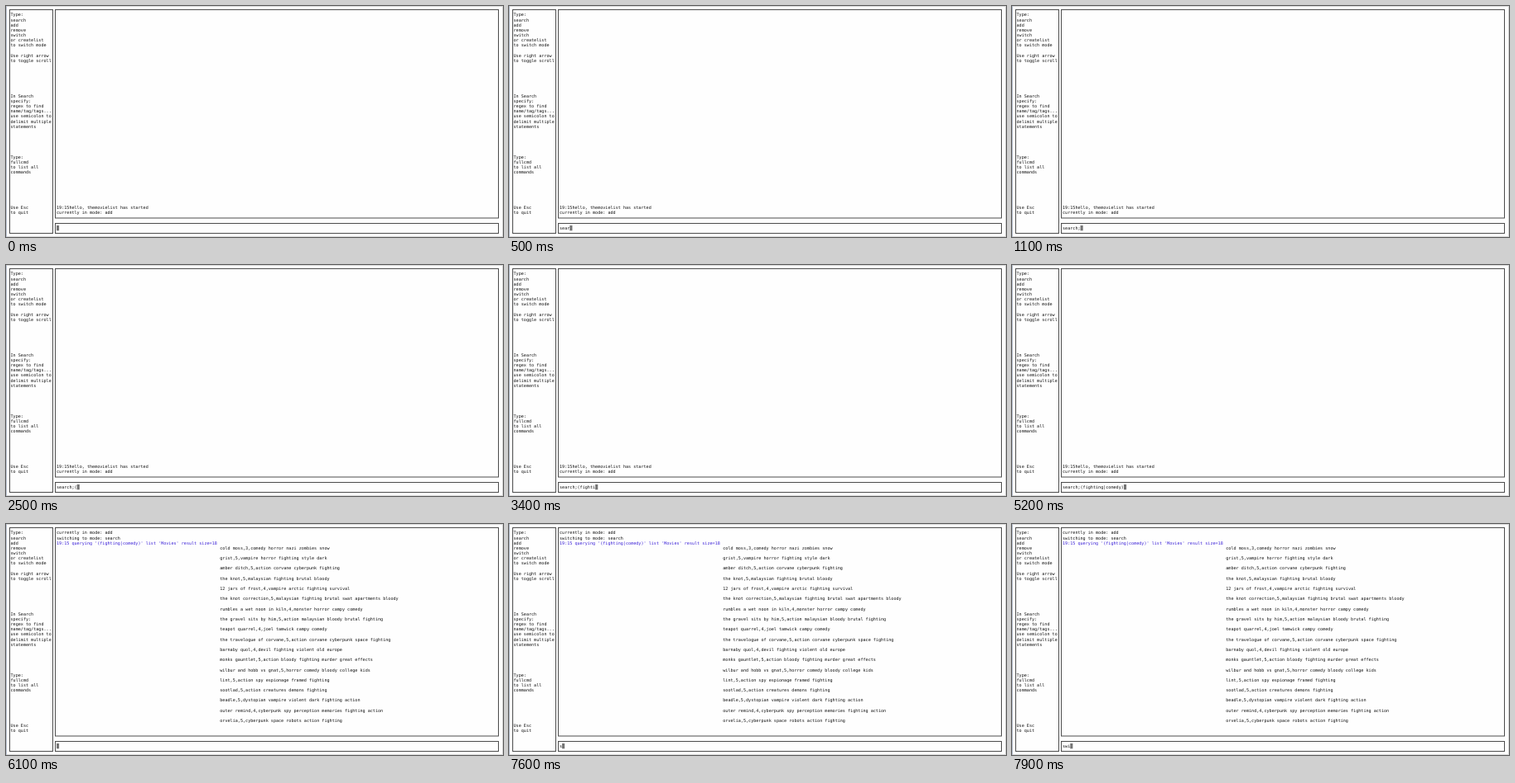
Write an HTML page that moves like this. It is 600x280 px and loops after 8 s.

```html
<!DOCTYPE html>
<html lang="en">
<head>
<meta charset="utf-8">
<title>Movie list terminal</title>
<style>
  html, body { margin: 0; width: 100%; height: 100%; overflow: hidden; background: #fefefe; }
  svg { display: block; width: 600px; height: 280px; }
  text {
    font: 5.12px "DejaVu Sans Mono", monospace;
    text-rendering: geometricPrecision;
    white-space: pre;
    fill: #111;
  }
  .blue { fill: #3a20d8; }
  .box { fill: none; stroke: #4c4c4c; stroke-width: 1; }
</style>
</head>
<body>
<svg id="stage" viewBox="0 0 600 280" xmlns="http://www.w3.org/2000/svg">
  <rect width="600" height="280" fill="#fefefe"/>
  <path d="M0 .5H600M0 279.5H600M599.5 0V280" stroke="#d8d8d8" fill="none"/>
  <path d="M.5 0V280" stroke="#b4bccb"/>
  <rect class="box" x="4.5" y="4.5" width="52" height="271"/>
  <rect class="box" x="59.5" y="4.5" width="535" height="252.5"/>
  <rect class="box" x="59.5" y="263.5" width="535" height="12"/>
  <g id="help"></g>
  <g id="intro"></g>
  <g id="results"></g>
  <text id="input"></text>
  <rect id="cursor" y="266" width="3.1" height="6.3" fill="#747474"/>
</svg>
<script>
const LOOP = 8000;
const COL = 3.083, ROW = 6.154;
const LEFT = 5.5, MAIN = 61, LIST = MAIN + 64 * COL;
const RESULTS_AT = 6100;
const QUERY = "search;(fighting|comedy)";
const COMMAND = "swi";

// [time, number of characters typed]
const KEYS = [
  [0, 0], [100, 1], [300, 2], [500, 4], [800, 5], [900, 6], [1100, 7], [2500, 8],
  [2800, 9], [2900, 10], [3000, 11], [3100, 12],
  [3300, 13], [3400, 14], [3500, 15], [3600, 16], [4000, 17],
  [4300, 18], [4400, 20], [4500, 21], [4700, 22], [4800, 23], [5200, 24],
  [RESULTS_AT, 0], [7600, 1], [7800, 2], [7900, 3]
];

const HELP = [
  [0, "Type:|search|add|remove|switch|or createlist|to switch mode"],
  [8, "Use right arrow|to toggle scroll"],
  [16, "In Search|specify:|regex to find|name/tag/tags...|use semicolon to|delimit multiple|statements"],
  [28, "Type:|fullcmd|to list all|commands"],
  [38, "Use Esc|to quit"]
];

const MOVIES = [
  "cold moss,3,comedy horror nazi zombies snow",
  "grist,5,vampire horror fighting style dark",
  "amber ditch,5,action riddle cyberpunk fighting".replace("riddle", "corvane"),
  "the knot,5,malaysian fighting brutal bloody",
  "12 jars of frost,4,vampire arctic fighting survival",
  "the knot correction,5,malaysian fighting brutal swat apartments bloody",
  "rumbles a wet noon in kiln,4,monster horror campy comedy",
  "the gravel sits by him,5,action malaysian bloody brutal fighting",
  "teapot quarrel,4,joel tamwick campy comedy",
  "the travelogue of corvane,5,action corvane cyberpunk space fighting",
  "barnaby quol,4,devil fighting violent old europe",
  "monks gauntlet,5,action bloody fighting murder great effects",
  "wilbur and hobb vs gnat,5,horror comedy bloody college kids",
  "lint,5,action spy espionage framed fighting",
  "sootlad,5,action creatures demons fighting",
  "beadle,5,dystopian vampire violent dark fighting action",
  "outer remind,4,cyberpunk spy perception memories fighting action",
  "orvelia,5,cyberpunk space robots action fighting"
];

const el = id => document.getElementById(id);
const baseline = row => 12.4 + row * ROW;

function write(group, x, row, str, cls) {
  const t = document.createElementNS("http://www.w3.org/2000/svg", "text");
  t.setAttribute("x", x);
  t.setAttribute("y", baseline(row));
  if (cls) t.setAttribute("class", cls);
  t.textContent = str;
  el(group).appendChild(t);
}

for (const [row, lines] of HELP)
  lines.split("|").forEach((s, i) => write("help", LEFT, row + i, s));

write("intro", MAIN, 38, "19:15hello, themovielist has started");
write("intro", MAIN, 39, "currently in mode: add");

write("results", MAIN, 0, "currently in mode: add");
write("results", MAIN, 1, "switching to mode: search");
write("results", MAIN, 2,
  `19:15 querying '(fighting|comedy)' list 'Movies' result size=${MOVIES.length}`, "blue");
MOVIES.forEach((s, i) => write("results", LIST, 3 + 2 * i, s));

el("input").setAttribute("x", MAIN);
el("input").setAttribute("y", baseline(42));

function draw(t) {
  const done = t >= RESULTS_AT;
  let typed = 0;
  for (const [at, n] of KEYS) if (t >= at) typed = n;
  el("intro").setAttribute("visibility", done ? "hidden" : "visible");
  el("results").setAttribute("visibility", done ? "visible" : "hidden");
  el("input").textContent = (done ? COMMAND : QUERY).slice(0, typed);
  el("cursor").setAttribute("x", MAIN + typed * COL);
}

const start = performance.now();
function tick() {
  draw((performance.now() - start) % LOOP);
  requestAnimationFrame(tick);
}
tick();
</script>
</body>
</html>
```
